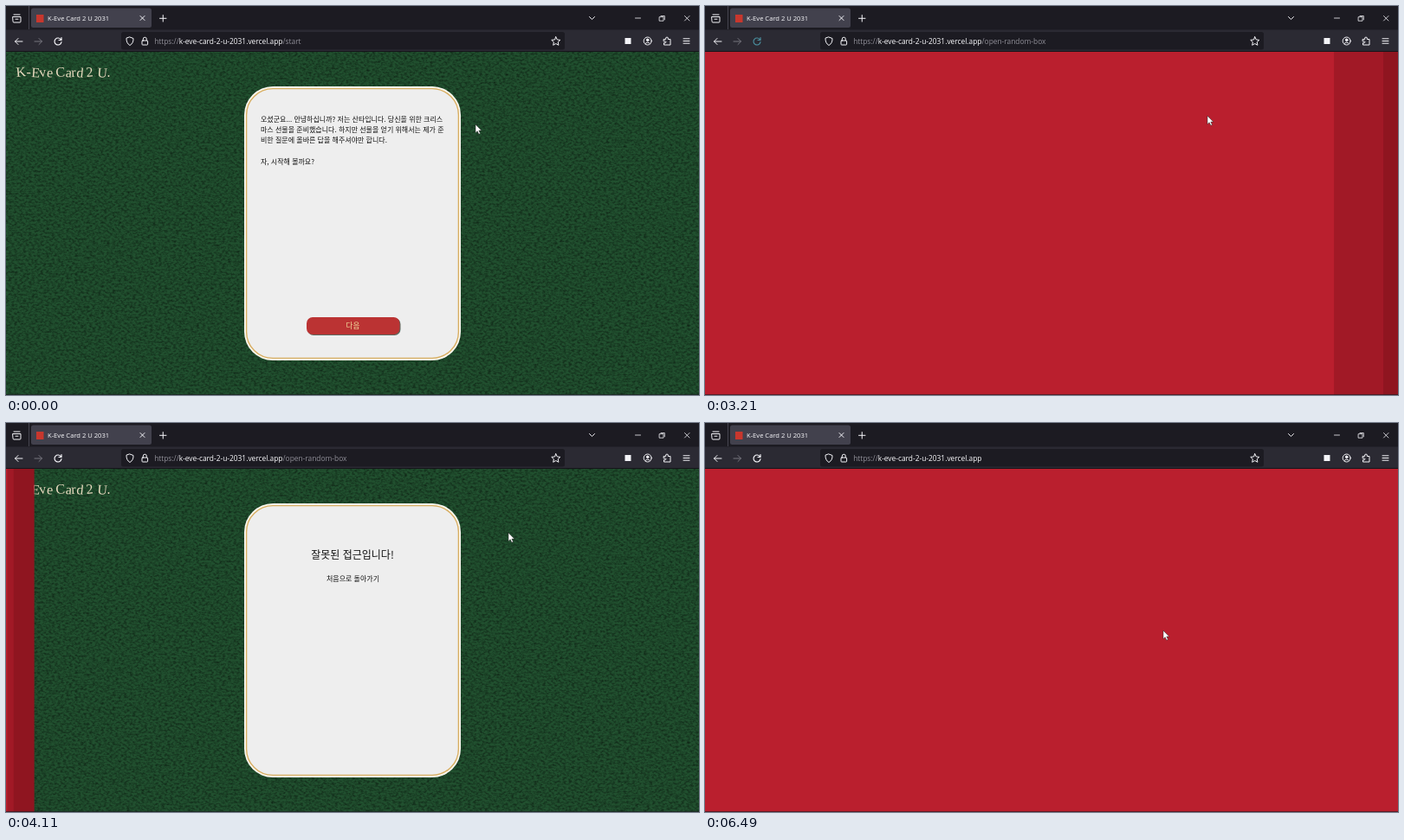
These frames come from a looping animation (800x450 px, 6740 ms). An HTML page:

```html
<!DOCTYPE html>
<html lang="ko">
<head>
<meta charset="utf-8">
<title>K-Eve Card 2 U 2031</title>
<style>
  html, body { margin: 0; width: 100%; height: 100%; overflow: hidden; background: #1c1b22; }
  svg { display: block; width: 100vw; height: 100vh; }
  text { font-family: "Open Sans", "Noto Sans", sans-serif; white-space: pre; }
  .ko { font-family: "Noto Sans CJK KR", "Noto Sans CJK", sans-serif; }
  .ico { fill: none; stroke: #f4f4f8; stroke-width: 1; stroke-linecap: round; stroke-linejoin: round; }
  .url { font-size: 8.4px; fill: #fbfbfe; }
  .body { font-size: 8px; fill: #111; }
  #shade { filter: drop-shadow(0 2px 4px rgba(0, 0, 0, .4)); }
</style>
</head>
<body>
<svg viewBox="0 0 800 450" xmlns="http://www.w3.org/2000/svg">
  <defs>
    <filter id="felt" x="0" y="0" width="1" height="1" color-interpolation-filters="sRGB">
      <feTurbulence type="fractalNoise" baseFrequency=".3 .42" numOctaves="3" seed="7"/>
      <feColorMatrix values="0 0 0 0 0  0 0 0 0 0  0 0 0 0 0  1.6 0 0 0 -.6"/>
    </filter>
    <clipPath id="tabClip"><rect x="29" y="2.5" width="139" height="22.5" rx="2.5"/></clipPath>
  </defs>

  <!-- page -->
  <rect y="52" width="800" height="398" fill="#21502f"/>
  <rect y="52" width="800" height="398" filter="url(#felt)" opacity=".6"/>
  <text x="12" y="82" font-size="16" fill="#e9dcc0" style="font-family:'Liberation Serif',serif"
    rotate="-5 0 4 -6 5 0 -4 5 -3 6 0 -5 0 5 0">K-Eve Card 2 U.</text>
  <rect x="275" y="93" width="250" height="317" rx="33" fill="#faf7ee"/>
  <rect x="277.6" y="95.6" width="244.8" height="311.8" rx="30.5" fill="#eee" stroke="#d8ae62" stroke-width="1.4"/>
  <g id="intro" class="body">
    <text class="ko" x="294" y="134">오셨군요... 안녕하십니까? 저는 산타입니다. 당신을 위한 크리스</text>
    <text class="ko" x="294" y="146">마스 선물을 준비했습니다. 하지만 선물을 얻기 위해서는 제가 준</text>
    <text class="ko" x="294" y="158.3">비한 질문에 올바른 답을 해주셔야만 합니다.</text>
    <text class="ko" x="294" y="183">자, 시작해 볼까요?</text>
    <rect x="348" y="361" width="107.5" height="20" rx="7" fill="#5d6b60"/>
    <rect x="347" y="360" width="107.5" height="20" rx="7" fill="#bb3333"/>
    <text class="ko" x="400.5" y="373.2" font-size="8.6" fill="#f2dc9c" text-anchor="middle">다음</text>
  </g>
  <g id="wrong" text-anchor="middle">
    <text class="ko" x="400" y="157" font-size="12" fill="#111">잘못된 접근입니다!</text>
    <text id="link" class="ko body" x="400.5" y="183">처음으로 돌아가기</text>
  </g>
  <rect class="sheet" y="52" height="398" fill="#8f1520"/>
  <rect class="sheet" y="52" height="398" fill="#a11926"/>
  <rect class="sheet" y="52" height="398" fill="#ba1f2e"/>
  <rect y="449" width="800" height="1" fill="#1c1b22" opacity=".6"/>

  <!-- browser frame -->
  <rect width="800" height="28" fill="#1c1b22"/>
  <rect y="27.5" width="800" height="25" fill="#2b2a33"/>
  <rect y="52" width="800" height="1" fill="#15141a"/>
  <rect x="26" width="1" height="27" fill="#45444f"/>
  <rect x="29" y="2.5" width="139" height="22.5" rx="2.5" fill="#42414d"/>
  <circle id="burst" cx="39" cy="14" fill="#3b5b85" clip-path="url(#tabClip)"/>
  <rect x="35" y="10" width="8.5" height="9" fill="#c8372d"/>
  <text x="48" y="17" font-size="7.6" fill="#fbfbfe">K-Eve Card 2 U 2031</text>
  <g class="ico">
    <path d="M8 12.5h9v5.5q0 1 -1 1h-7q-1 0 -1-1zM9 10h7M11 15.2h3"/>
    <path d="M155 11.5l5 5m0-5l-5 5M177.5 14.3h7.5m-3.75-3.75v7.5M673.5 12.5l3 3 3-3"/>
    <path stroke-width=".8" d="M726.5 14h6M754.5 12.7h4.5v4.5h-4.5zM756 11.5h4.3v4.3M783.5 11.5l5.5 5.5m0-5.5l-5.5 5.5"/>
    <path d="M19 41h-8.5m3.5-3.5l-3.5 3.5 3.5 3.5"/>
    <path stroke="#77767f" d="M33 41h8.5m-3.5-3.5l3.5 3.5-3.5 3.5"/>
    <path id="reload" stroke-width="1.2" d="M63.5 39a4 4 0 1 0 .5 2.5M64 36.5v3h-3"/>
    <circle cx="740.7" cy="40.5" r="4.5"/>
    <path d="M738 43.5q2.7-3 5.4 0"/>
    <circle cx="740.7" cy="39.3" r="1.3" fill="#f4f4f8"/>
    <path d="M759.5 38.5h2.2q-.6-2.5 1.3-2.5t1.3 2.5h2.7v6.5h-7.5v-2.3q2.5 .4 2.5-1t-2.5-1zM782 37.8h7m-7 2.7h7m-7 2.7h7"/>
  </g>
  <rect x="714.5" y="37" width="7" height="7" fill="#f4f4f8"/>
  <rect id="bar" x="133" y="30" width="512" height="20.5" rx="2.5" fill="#1c1b22"/>

  <!-- suggestions -->
  <g id="panel">
    <rect id="shade" rx="3" fill="#42414d" stroke="#52515d" stroke-width=".6"/>
    <path d="M132 52.5h514M132 193.5h514" stroke="#55545f" stroke-width=".8"/>
    <rect id="hover" x="134" y="124.2" width="510" height="20" rx="2.5" fill="#5e5d68"/>
    <g id="rows"></g>
    <text class="ko" x="138" y="212" font-size="9.2" fill="#b4b3bd">이번만 검색:</text>
    <circle cx="206" cy="208.7" r="4.8" fill="#fff"/>
    <rect x="226.5" y="204.2" width="9.5" height="9.5" fill="#1e7a22"/>
    <rect x="252" y="205" width="8" height="8" fill="#3a86c8"/>
    <rect x="276.2" y="204" width="9.5" height="9.5" fill="#fff"/>
    <circle cx="306" cy="208.7" r="4.8" fill="#de5833"/>
    <path id="fav" fill="#1cbce8"/>
    <g class="ico">
      <rect x="351.5" y="205" width="9.5" height="7.5"/>
      <circle cx="380.7" cy="208.7" r="4.5"/><path d="M380.7 206v3h2.3"/>
      <circle cx="634.7" cy="208.7" r="3.4"/><circle cx="634.7" cy="208.7" r="1.3"/>
      <circle cx="634.7" cy="208.7" r="4.4" stroke-dasharray="1.7 1.75" stroke-linecap="butt"/>
    </g>
  </g>

  <!-- address -->
  <g id="site" class="ico">
    <path d="M143 36l4 1.5q.3 5.5-4 8-4.3-2.5-4-8z"/>
    <rect x="157" y="40" width="6.6" height="5" rx=".8"/><path d="M158.3 40v-1.8a2 2 0 0 1 4 0v1.8"/>
    <path id="star"/>
  </g>
  <g id="find" class="ico">
    <circle cx="142" cy="39.5" r="3"/><path d="M144.3 41.8l3 3M631 40.7h8m-3-3l3 3-3 3"/>
  </g>
  <text id="url" class="url" y="44"><tspan id="scheme">https://</tspan><tspan>k-eve-card-2-u-2031.vercel.app</tspan><tspan id="path"></tspan></text>
  <rect id="caret" y="35.5" width=".9" height="10.5" fill="#fbfbfe"/>

  <!-- pointer -->
  <circle id="press" r="7.5" fill="#c8c01e" opacity=".75"/>
  <g id="pointer">
    <path id="arrow" d="M0 0v9.7l2.2-2 1.6 3.5 1.7-.8-1.6-3.3h3z" fill="#fff" stroke="#222" stroke-width=".5"/>
    <path id="beam" d="M-1.5-4.5h3M0-4.5v9M-1.5 4.5h3" stroke="#17161b" stroke-width=".8" fill="none"/>
    <path id="hand" d="M-1 0q1-1 2 0v4l3.5 .8q1.5 .4 1.3 2l-.6 4h-5l-3.2-4.3q.5-1.2 2 0z" fill="#fff" stroke="#222" stroke-width=".6"/>
  </g>
</svg>
<script>
const LOOP = 6740;
const $ = id => document.getElementById(id);
const set = (el, attrs) => { for (const k in attrs) el.setAttribute(k, attrs[k]); };
const show = (el, on) => { el.style.display = on ? '' : 'none'; };
const clamp = v => Math.max(0, Math.min(1, v));
const part = (t, a, b) => clamp((t - a) / (b - a));
const mix = (a, b, k) => a + (b - a) * k;
const smooth = k => k * k * (3 - 2 * k);
const sheets = [...document.querySelectorAll('.sheet')];

// cubic-bezier(.42, 0, .58, 1)
function easeInOut(x) {
  let lo = 0, hi = 1;
  for (let i = 0; i < 24; i++) {
    const s = (lo + hi) / 2, r = 1 - s;
    if (1.26 * s * r * r + 1.74 * s * s * r + s * s * s < x) lo = s; else hi = s;
  }
  return smooth(lo);
}

function starPath(cx, cy, r) {
  const pts = Array.from({ length: 10 }, (_, i) => {
    const a = i * Math.PI / 5 - Math.PI / 2, q = i % 2 ? r * .48 : r;
    return (cx + q * Math.cos(a)).toFixed(2) + ' ' + (cy + q * Math.sin(a)).toFixed(2);
  });
  return 'M' + pts.join('L') + 'z';
}
set($('star'), { d: starPath(634.8, 41, 5.3) });
set($('fav'), { d: starPath(331, 209, 5.6) });

// title, address, address x, icon colour, round icon
const sites = [
  ['Zokreel', 'zokreel.com', 202, '#e62117', 0],
  ['Palnorum', 'palnorum.com', 206.5, '#3b5998', 0],
  ['Lorevanta', 'lorevanta.org', 208, '#fff', 0],
  ['Thrumo', 'thrumo.com', 195, '#f0441c', 1],
  ['Bexaro', 'bexaro.com', 201.5, '#fff', 0],
  ['Chirvel', 'chirvel.com', 196, '#1da1e2', 1]
];
$('rows').innerHTML = sites.map(([name, link, x, color, round], i) => {
  const y = 67 + 22.5 * i;
  return `<rect x="138.3" y="${y - 4.7}" width="9.4" height="9.4" rx="${round ? 4.7 : 0}" fill="${color}"/>
    <text x="154" y="${y + 3.3}" font-size="8.4" fill="#fbfbfe">${name}</text>
    <path d="M${x - 11.5} ${y + .7}h8.5" stroke="#8f8e99" stroke-width=".7"/>
    <text x="${x}" y="${y + 2.8}" font-size="7.2" fill="#12bfe6">${link}</text>`;
}).join('');

// start, end, from x, y, to x, y
const moves = [
  [280, 930, 542, 137, 413, 41],
  [1500, 1680, 413, 41, 417, 41],
  [2810, 2810, 417, 41, 580, 127],
  [4620, 5260, 580, 127, 428, 178],
  [6010, 6490, 428, 178, 529, 240]
];
function pointerAt(t) {
  let pos = [542, 137];
  for (const [a, b, x0, y0, x1, y1] of moves) {
    if (t < a) break;
    let k = a === b ? 1 : part(t, a, b);
    if (a === 4620) k = Math.pow(k, .75);
    k = smooth(k);
    pos = [mix(x0, x1, k), mix(y0, y1, k)];
  }
  return pos;
}

function draw(t) {
  const open = t >= 1350 && t < 2930;
  const typed = t >= 2810;
  const moved = t >= 3170;
  const home = t >= 5500;

  show($('intro'), !moved);
  show($('wrong'), moved);

  // dark sheet lags behind the lighter ones
  [3226, 3116, 3014].forEach((start, i) => {
    const p = 1 - easeInOut(part(t, start, start + 1285));
    set(sheets[i], { width: home ? 800 : moved ? 800 * p * p : 0 });
  });

  const k = part(t, 1350, 1470);
  show($('panel'), open);
  show($('bar'), !open);
  set($('shade'), {
    x: 133 - 3 * k, width: 512 + 6 * k,
    y: 29.3 - 2 * k, height: 192 + 4.2 * k
  });
  show($('hover'), typed);

  const editing = open && typed;
  show($('site'), !editing);
  show($('find'), editing);
  const left = editing ? 154 : 171.2;
  const tail = home ? '' : typed ? '/open-random-box' : '/start';
  if ($('path').textContent !== tail) $('path').textContent = tail;
  set($('url'), { x: left });
  const dim = open ? '#fbfbfe' : '#8f8e97';
  set($('scheme'), { fill: dim });
  set($('path'), { fill: dim });
  show($('caret'), open);
  if (open) set($('caret'), { x: left + $('url').getComputedTextLength() + .3 });

  const busy = t >= 3170 && t < 4000 || t >= 5500 && t < 6200;
  $('reload').style.stroke = busy ? '#4a8c9c' : '';
  const b = t < 5000 ? t - 3390 : t - 5640;
  show($('burst'), b > 0 && b < 280);
  set($('burst'), { r: Math.max(0, b * .81), opacity: .8 * (1 - part(b, 130, 280)) });

  const [x, y] = pointerAt(t);
  const beam = t >= 970 && t < 2810;
  const hand = t >= 5170 && t < 5500;
  set($('pointer'), { transform: `translate(${x.toFixed(2)} ${y.toFixed(2)})` });
  show($('beam'), beam);
  show($('hand'), hand);
  show($('arrow'), !beam && !hand);
  set($('link'), { 'text-decoration': hand ? 'underline' : 'none' });
  show($('press'), t >= 1350 && t < 1500 || t >= 5320 && t < 5450);
  set($('press'), { cx: x, cy: y });
}

function tick(now) {
  draw(now % LOOP);
  requestAnimationFrame(tick);
}
draw(0);
requestAnimationFrame(tick);
</script>
</body>
</html>
```
